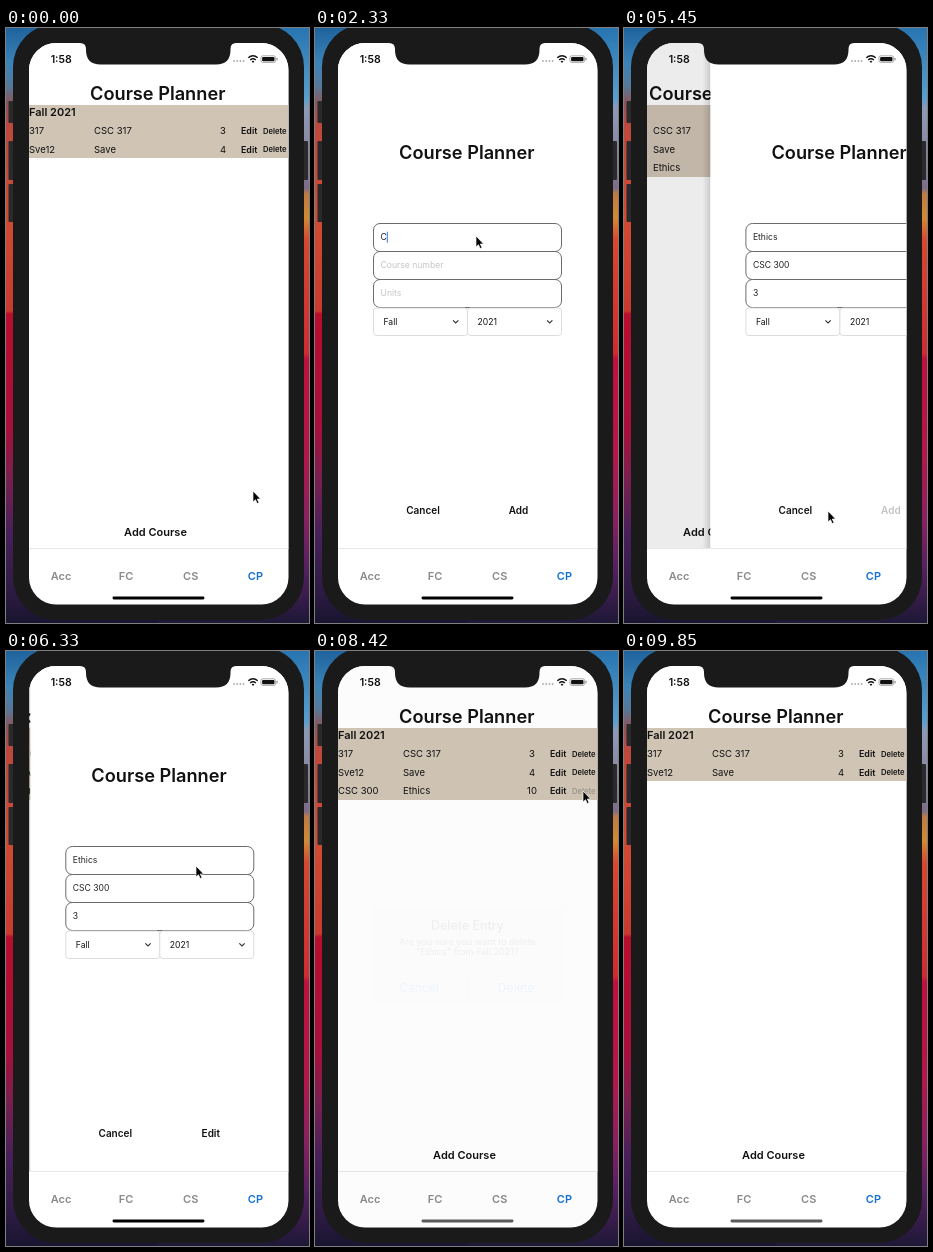
Write an HTML page that moves like this. It is 303 px wide and 595 px high and loops after 9.88 s.

```html
<!DOCTYPE html>
<html lang="en">
<head>
<meta charset="utf-8">
<title>Course Planner</title>
<style>
html, body { margin: 0; width: 100%; height: 100%; overflow: hidden; background: #1a1a1c; }
svg { display: block; width: 303px; height: 595px; }
text { font-family: Inter, Roboto, sans-serif; white-space: pre; }
</style>
</head>
<body>
<svg id="stage" viewBox="0 0 303 595" xmlns="http://www.w3.org/2000/svg"></svg>
<script>
const LOOP = 9880;
const stage = document.getElementById('stage');

// ---------- markup helpers ----------
const text = (x, y, size, str, o = {}) =>
  `<text x="${x}" y="${y}" font-size="${size}" font-weight="${o.w || 400}" fill="${o.c || '#111'}"` +
  ` text-anchor="${o.a || 'start'}"${o.id ? ` id="${o.id}"` : ''}>${str}</text>`;
const rect = (x, y, w, h, fill, more = '') =>
  `<rect x="${x}" y="${y}" width="${w}" height="${h}" fill="${fill}" ${more}/>`;
const mid = { w: 600, a: 'middle' };
const gradient = (id, stops) =>
  `<linearGradient id="${id}" x1="0" y1="0" x2="0" y2="595" gradientUnits="userSpaceOnUse">` +
  stops.map(([y, c]) => `<stop offset="${y / 595}" stop-color="${c}"/>`).join('') + '</linearGradient>';

const row = (y, i, code, name, units) =>
  `<g id="row${i}">` + text(23, y, 9.5, code) + text(88, y, 9.5, name) +
  text(217, y, 9.5, units, { a: 'middle', id: 'units' + i }) +
  text(235, y, 8.9, 'Edit', { w: 600, id: 'edit' + i }) +
  text(257, y - .4, 7.6, 'Delete', { w: 600, id: 'del' + i }) + '</g>';

const field = (i) => rect(58.5, 195.5 + 28 * i, 188, 28, '#fff', 'rx="6.5" stroke="#6b6b6b"') +
  text(65.5, 212.4 + 28 * i, 8.6, '', { id: 'field' + i });

const select = (x, label) => rect(x, 280, 94, 27.5, '#fff', 'rx="3" stroke="#dcdcdc"') +
  text(x + 10, 297, 8.6, label) +
  `<path d="M${x + 79.5} 292.3l2.7 2.7 2.7-2.7" fill="none" stroke="#333" stroke-width="1.1"/>`;

stage.innerHTML = `
<defs>
  ${gradient('left', [[0, '#1f639c'], [35, '#3a83b8'], [58, '#56799a'], [75, '#8a565c'], [98, '#bd483d'],
    [190, '#d04b33'], [283, '#c93a2e'], [286, '#b90d2d'], [400, '#a80f3c'], [450, '#7a1f50'],
    [505, '#48205a'], [560, '#2f1b45'], [595, '#191530']])}
  ${gradient('right', [[0, '#2874b0'], [70, '#55a0d0'], [80, '#8c9ab6'], [112, '#8a8ba8'], [160, '#7d6c8a'],
    [166, '#c07c40'], [190, '#d38933'], [212, '#d8472e'], [325, '#d02b31'], [331, '#c0103c'],
    [430, '#b3164b'], [490, '#8a2060'], [540, '#552060'], [595, '#1d1836']])}
  <linearGradient id="shade"><stop offset="0" stop-color="#000" stop-opacity="0"/>
    <stop offset="1" stop-color="#000" stop-opacity=".14"/></linearGradient>
  <clipPath id="screen"><rect x="23" y="15" width="259.5" height="561.5" rx="27"/></clipPath>
  <clipPath id="page"><rect x="23" y="15" width="259.5" height="505"/></clipPath>
</defs>
${rect(0, 0, 152, 595, 'url(#left)')}${rect(152, 0, 151, 595, 'url(#right)')}
${[[73, 22], [113, 39], [156, 38]].map(([y, h]) => rect(2.5, y, 6, h, '#2a2a2c', 'rx="1"')).join('')}
${rect(297, 113, 5, 39, '#2a2a2c', 'rx="1"')}
${rect(7, -4, 291, 596, '#1a1a1b', 'rx="43"')}
<g clip-path="url(#screen)">
  ${rect(23, 15, 260, 562, '#fff')}
  <g clip-path="url(#page)">
    <g id="list">
      ${rect(23, 15, 260, 505, '#fff')}
      ${text(151.7, 72.3, 18.2, 'Course Planner', mid)}
      ${rect(23, 77, 260, 53, '#d0c5b5', 'id="table"')}
      ${text(23, 87.8, 11, 'Fall 2021', { w: 600 })}
      ${row(106, 0, '317', 'CSC 317', '3')}
      ${row(124.6, 1, 'Sve12', 'Save', '4')}
      ${row(143.3, 2, 'CSC 300', 'Ethics', '3')}
      ${text(149.5, 508.3, 11, 'Add Course', { ...mid, id: 'addCourse' })}
      ${rect(23, 15, 260, 505, '#000', 'id="pageDim"')}
    </g>
    <g id="form">
      ${rect(15, 15, 8, 505, 'url(#shade)')}
      ${rect(23, 15, 260, 505, '#fff')}
      ${text(151.7, 131.3, 18.2, 'Course Planner', mid)}
      ${[0, 1, 2].map(field).join('')}
      ${select(58.5, 'Fall')}${select(152.5, '2021')}
      ${text(108, 486.4, 10, 'Cancel', mid)}
      ${text(203.5, 486.4, 10, 'Add', { ...mid, id: 'submit' })}
      ${rect(0, 0, 1, 11, '#2f78dc', 'id="caret"')}
    </g>
  </g>
  ${rect(23, 520, 260, 1, '#e6e6e6')}
  ${[['Acc', 55], ['FC', 120], ['CS', 184.7], ['CP', 249.4]].map(([s, x]) =>
    text(x, 552, 11, s, { ...mid, c: s === 'CP' ? '#1570d2' : '#8a8a8c' })).join('')}
  ${text(55.2, 34.6, 10.6, '1:58', mid)}
  ${[228, 231.2, 234.4, 237.6].map(x => `<circle cx="${x}" cy="33" r=".9" fill="#aaa"/>`).join('')}
  <g fill="none" stroke="#111" stroke-width="1.5">
    <path d="M242.3 29.8q4.7-4 9.4 0M244.2 32q2.8-2.4 5.6 0"/>
  </g>
  <path d="M245.6 33.3q1.4-1.1 2.8 0l-1.4 1.6z" fill="#111"/>
  ${rect(255, 27.8, 14.6, 6.6, '#fff', 'rx="1.8" stroke="#888" stroke-width=".7"')}
  ${rect(256.1, 28.9, 12.4, 4.4, '#111', 'rx="1"')}${rect(270.5, 29.8, 1, 2.6, '#888', 'rx=".5"')}
  ${rect(23, 15, 260, 562, '#000', 'id="dim"')}
  ${rect(106.5, 568.6, 92, 2.8, '#000', 'rx="1.4" id="home"')}
  <g id="alert">
    ${rect(68, 259, 169.5, 87.5, '#f0f0f0', 'rx="7.5"')}
    ${text(152.5, 281.6, 10.9, 'Delete Entry', { ...mid, w: 500 })}
    ${text(152.5, 294.8, 8, 'Are you sure you want to delete', { a: 'middle' })}
    ${text(152.5, 304.2, 8, '&quot;Ethics&quot; from Fall 2021?', { a: 'middle' })}
    ${rect(68, 318, 169.5, .8, '#c9c9cb')}${rect(152.4, 318, .8, 28.5, '#c9c9cb')}
    ${text(110, 336, 10.6, 'Cancel', { a: 'middle', c: '#0a7cf0' })}
    ${text(195, 336, 10.6, 'Delete', { a: 'middle', c: '#0a7cf0', id: 'confirm' })}
  </g>
</g>
<path d="M74 14H230V15Q224.500 15 224.500 21V22Q224.500 36.500 210 36.500H94.500Q80 36.500 80 22V21Q80 15 74 15Z" fill="#1a1a1b"/>
<path id="cursor" d="M0 0V11L2.500 8.700L4.200 12.600L6 11.800L4.300 8H7.600Z" fill="#000" stroke="#fff" stroke-width=".7"/>`;

const el = {};
stage.querySelectorAll('[id]').forEach(n => el[n.id] = n);
const set = (id, name, value) => el[id].setAttribute(name, value);

// ---------- timeline ----------
const clamp = v => Math.max(0, Math.min(1, v));
const ramp = (t, a, b) => { const u = clamp((t - a) / (b - a)); return u * u * (3 - 2 * u); };
const latest = (t, keys) => keys.reduce((v, [k, s]) => t >= k ? s : v, keys[0][1]);
const spring = d => { const x = Math.max(0, d) / 54; return 1 - (1 + x) * Math.exp(-x); };
const press = (t, at) => 1 - .75 * (ramp(t, at - 50, at + 40) - ramp(t, at + 90, at + 300));
const typed = (str, times) => times.map((k, i) => [k, str.slice(0, i + 1)]);

// time, x, y of the pointer tip
const PATH = [
  [0, 247, 463], [200, 247, 463], [760, 150, 504], [1050, 150, 504], [1900, 161, 208], [3620, 161, 208],
  [3790, 139, 237], [3980, 139, 237], [4250, 139, 244], [4480, 139, 244], [4740, 138, 266], [4960, 138, 266],
  [5300, 204, 483], [5480, 204, 483], [5830, 243, 139], [6000, 243, 139], [6330, 190, 215],
  [6600, 150, 264], [7040, 150, 264], [7400, 204, 483], [7580, 204, 483], [8240, 268, 140],
  [8430, 268, 140], [8720, 180, 333], [9000, 180, 333], [9600, 312, 430], [LOOP, 312, 430]
];
const NAME = [[0, ''], [2250, 'C'], [2620, ''], ...typed('Ethics', [2830, 2960, 3160, 3300, 3420, 3540])];
const CODE = [[0, ''], ...typed('CSC 300', [3950, 4020, 4110, 4190, 4260, 4330, 4430])];
const UNITS = [[0, ''], [4900, '3'], [6760, ''], [6880, '1'], [6980, '10']];
const HINTS = ['Course name', 'Course number', 'Units'];
const FOCUS = [[0, -1], [1980, 0], [3800, 1], [4760, 2], [5350, -1], [6640, 2], [7450, -1]];

function pointer(t) {
  const i = Math.max(1, PATH.findIndex(p => p[0] > t));
  const [a, b] = [PATH[i - 1], PATH[i]];
  const u = ramp(t, a[0], b[0]);
  return [a[1] + (b[1] - a[1]) * u, a[2] + (b[2] - a[2]) * u];
}

function render(t) {
  // pages
  const shown = t < 5400 ? spring(t - 850) - spring(t - 5400) : spring(t - 5930) - spring(t - 7500);
  const p = t >= 5400 && t < 5930 ? 1 - spring(t - 5400) : clamp(shown);
  set('list', 'transform', `translate(${-78 * p})`);
  set('pageDim', 'opacity', .1 * p);
  set('form', 'transform', `translate(${260 * (1 - p)})`);
  set('form', 'visibility', p < .002 ? 'hidden' : 'visible');

  // table
  const third = t >= 5400 && t < 8770;
  set('row2', 'visibility', third ? 'visible' : 'hidden');
  set('table', 'height', third ? 72 : 53);
  el.units2.textContent = t < 7500 ? '3' : '10';
  set('addCourse', 'opacity', press(t, 800));
  set('edit2', 'opacity', press(t, 5890));
  set('del2', 'opacity', press(t, 8370));

  // form
  [NAME, CODE, UNITS].forEach((keys, i) => {
    const value = latest(t, keys), node = el['field' + i];
    node.textContent = value || HINTS[i];
    node.setAttribute('fill', value ? '#222' : '#c4c4c6');
  });
  el.submit.textContent = t < 5930 ? 'Add' : 'Edit';
  set('submit', 'opacity', Math.min(press(t, 5360), press(t, 7450)));
  const focus = latest(t, FOCUS);
  set('caret', 'visibility', focus < 0 || p < .002 ? 'hidden' : 'visible');
  if (focus >= 0) {
    const value = latest(t, [NAME, CODE, UNITS][focus]);
    set('caret', 'x', 65.5 + (value ? el['field' + focus].getComputedTextLength() : 0));
    set('caret', 'y', 203.7 + 28 * focus);
  }

  // alert
  const enter = ramp(t, 8390, 8610);
  const scale = 1 + .15 * (1 - enter);
  set('dim', 'opacity', .2 * enter * (1 - ramp(t, 8780, 9040)));
  set('alert', 'opacity', .92 * enter * (1 - ramp(t, 8740, 8960)));
  set('alert', 'transform', `translate(152.5 303) scale(${scale}) translate(-152.5 -303)`);
  set('confirm', 'opacity', t > 8710 ? .4 : 1);
  set('home', 'fill', t < 8390 ? '#000' : '#5a5a5c');

  set('cursor', 'transform', `translate(${pointer(t)})`);
}

const start = performance.now();
function tick() {
  render((performance.now() - start) % LOOP);
  requestAnimationFrame(tick);
}
tick();
</script>
</body>
</html>
```
